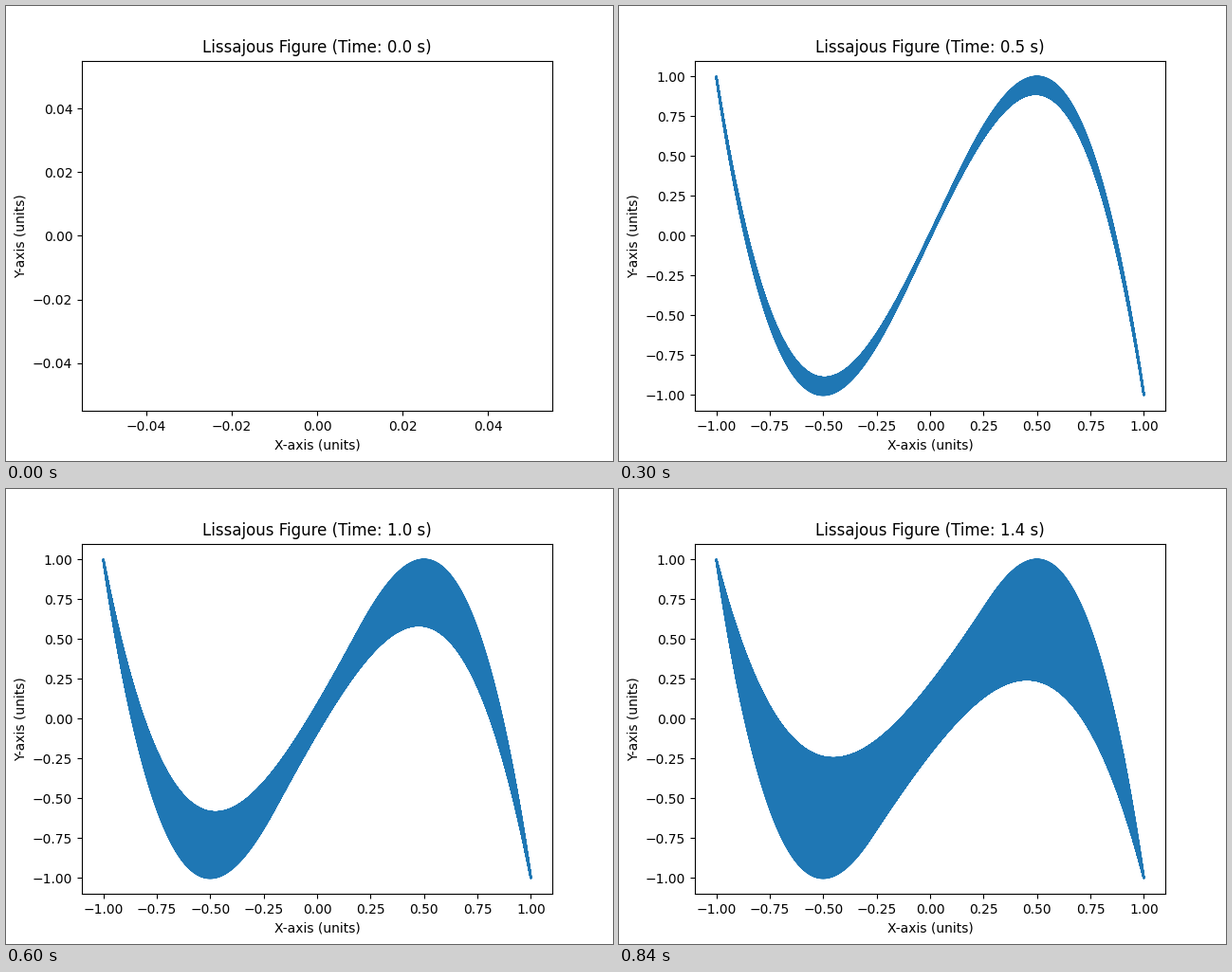
Write a matplotlib script that moves like this. It is 640x480 px and loops after 900 ms.

```python
import numpy as np
import matplotlib.pyplot as plt
from matplotlib.animation import FuncAnimation

FRAMES = 15
INTERVAL = 60      # ms
STEP = 0.1         # simulated seconds per frame
SAMPLES = 1000     # fixed count, so chords grow longer as time passes
FREQ_X, FREQ_Y = 100, 300

fig, ax = plt.subplots(figsize=(6.4, 4.8), dpi=100)


def draw(frame):
    end = frame * STEP
    t = np.linspace(0, end, SAMPLES)
    ax.clear()
    ax.plot(np.sin(2 * np.pi * FREQ_X * t), np.sin(2 * np.pi * FREQ_Y * t))
    ax.set_title(f"Lissajous Figure (Time: {end:.1f} s)")
    ax.set_xlabel("X-axis (units)")
    ax.set_ylabel("Y-axis (units)")


anim = FuncAnimation(fig, draw, frames=FRAMES, interval=INTERVAL,
                     init_func=lambda: draw(0), repeat=True, repeat_delay=0)
plt.show()
```
